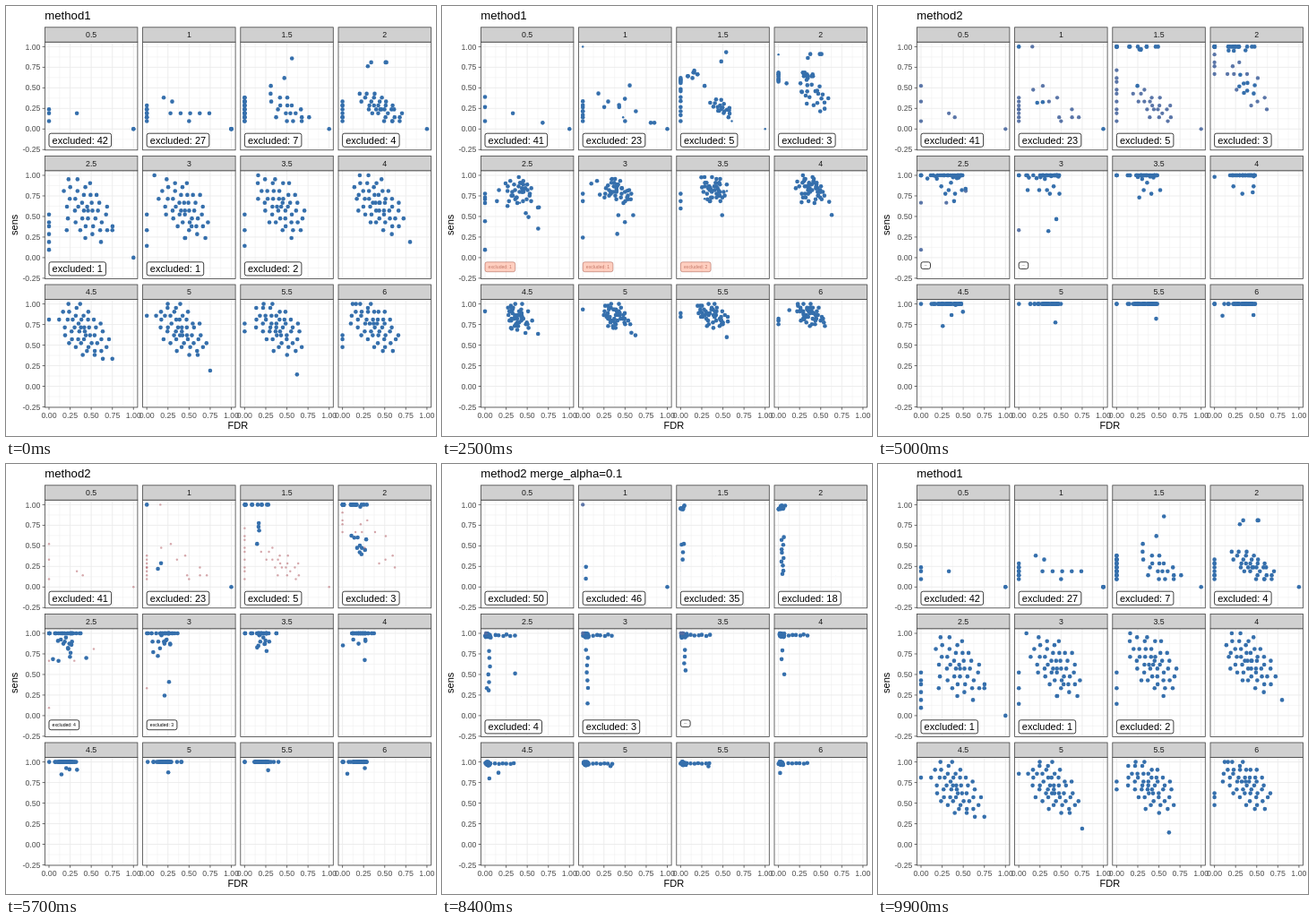
Animation of 480x480 px, one loop 10000 ms. Source, as an HTML page:

```html
<!DOCTYPE html>
<html lang="en">
<head>
<meta charset="utf-8">
<title>sens / FDR</title>
<style>
html, body { margin: 0; width: 100%; height: 100%; overflow: hidden; background: #fff; }
svg { display: block; width: 100vw; height: 100vh; font-family: "Liberation Sans", Arial, sans-serif; }
</style>
</head>
<body>
<svg id="chart" viewBox="0 0 480 480"></svg>
<script>
const svg = document.getElementById('chart');
const BLUE = '#356fac', GRID = '#ebebeb', EDGE = '#444';
const X0 = 48, Y0 = 137.3, UX = 94.3, UY = 91.9, DX = 109.2, DY = 143.6;
const LEFT = 43.4, TOP = 40.2, W = 103.5, H = 120.6;
const R = 2.3, PAD = 3.6, FONT = 11, CAP = 7.9, TAG_Y = 4.9;

function set(el, attrs) {
  for (const k in attrs) el.setAttribute(k, attrs[k]);
}
function add(tag, attrs, parent = svg) {
  const el = document.createElementNS('http://www.w3.org/2000/svg', tag);
  set(el, attrs);
  return parent.appendChild(el);
}
function label(str, x, y, size, fill = '#000', anchor = 'middle', more = {}) {
  const el = add('text', { x, y, 'font-size': size, fill, 'text-anchor': anchor, ...more });
  el.textContent = str;
  return el;
}
const line = (x1, y1, x2, y2, stroke, width) =>
  add('line', { x1, y1, x2, y2, stroke, 'stroke-width': width });
const mix = (a, b, t) => a + (b - a) * t;
const clamp = (v, lo, hi) => Math.max(lo, Math.min(hi, v));

let seed = 7;
function rnd() {
  seed = (seed * 1664525 + 1013904223) % 4294967296;
  return seed / 4294967296;
}

// A point is [FDR in percent, sens in 21sts]; null is an excluded run.
const many = (n, make) => Array.from({ length: n }, (_, i) => make(i));
const column = (n, lo, hi) => many(n, i => [0, Math.round(mix(lo, hi, n > 1 ? i / (n - 1) : 0))]);
const row = (n, lo, hi, k = 21) => many(n, () => [mix(lo, hi, Math.sqrt(rnd())), k]);
const spread = (n, lo, hi, k = 21) => many(n, i => [mix(lo, hi, i / (n - 1)), k]);
const corner = n => many(n, () => [5 * rnd() * rnd(), 21]);
const drop = (n, lo, hi) => many(n, i => [1 + 2.5 * rnd(), mix(lo, hi, (i + 0.5) / n)]);
function cloud(n, cx, rx, cy, ry, slope) {
  const phase = rnd() * 6.28;
  return many(n, i => {
    const r = Math.pow((i + 0.5) / n, 0.65), a = phase + i * 2.4;
    const dx = rx * r * Math.cos(a);
    const k = Math.round(cy + slope * dx + ry * r * Math.sin(a));
    return [cx + dx, clamp(k, 2, 21)];
  });
}

// Linked runs hold one point per method; the other runs follow in order.
const panels = [];
function panel(name, excluded, linked, ...rest) {
  const states = rest.map((points, i) => [...linked.map(run => run[i]), ...points]);
  panels.push({ name, excluded, states });
}
const NIL = [100, 0];

panel('0.5', [42, 41, 50], [
  [[33, 4], [33, 4], null],
  [NIL, [40, 3], null],
  [NIL, NIL, null]
], column(3, 2, 5), column(3, 2, 11), []);

panel('1', [27, 23, 46], [
  [[30, 7], [30, 7], [2, 5]],
  [[28, 4], [23, 7], [2, 2]],
  [NIL, NIL, NIL],
  [null, [0, 21], [0, 21]],
  [NIL, [16, 21], null],
  [NIL, [63, 3], null],
  [NIL, [71, 3], null],
  [[50, 2], [50, 2], null],
  [[20, 8], [17, 10], null]
], [...column(8, 2, 6), ...spread(4, 40, 74, 4)],
  [...column(8, 2, 8), ...cloud(5, 45, 28, 7, 4, -0.1)], []);

panel('1.5', [7, 5, 35], [
  [[56, 18], [52, 21], [1, 21]],
  [[47, 13], [49, 21], [1, 21]],
  [[31, 11], [26, 11], [2, 11]]
], [...column(12, 2, 8), ...column(9, 2, 8), ...cloud(18, 52, 26, 4.6, 4, -0.1), NIL],
  [...row(4, 0, 0), ...row(8, 9, 38), ...column(9, 2, 15), ...cloud(20, 44, 26, 6, 4, -0.12), NIL],
  [...corner(9), ...drop(3, 6, 12)]);

panel('2', [4, 3, 18], [
  [[30, 16], [39, 20], [1, 21]],
  [[34, 17], [41, 21], [2, 21]],
  [[51, 17], [47, 21], [1, 21]],
  [[52, 17], [50, 21], [5, 21]]
], [...column(8, 2, 7), ...cloud(33, 46, 28, 5.4, 3.6, -0.11), NIL],
  [...row(8, 0, 0), ...row(12, 8, 31), ...cloud(19, 39, 27, 11, 5, -0.16), ...column(4, 14, 19)],
  [...corner(18), ...drop(10, 2.5, 14)]);

// From 2.5 on, each panel follows one rule driven by its effect size.
function dense(size, excluded, zeros, linked = []) {
  const left = 50 - linked.length, low = Math.max(0, Math.round(12 - 2.4 * size));
  const n = zeros[0];
  panel(String(size), excluded, linked,
    [...column(...zeros), ...cloud(left - n - excluded[0], 50 - 2 * size, 31, 10 + 0.9 * size, 9 - 0.5 * size, -0.12)],
    [...row(n || 1, 0, 0), ...row(left - (n || 1) - low - 1, 8, 51), ...cloud(low + 1, 38, 18, 17, 3, 0)],
    [...corner(n), ...drop(low, mix(5, 16, (size - 2.5) / 2), 18), ...spread(6, 10, 34), ...corner(left - n - low - 6)]);
}
dense(2.5, [1, 0, 4], [4, 6, 11], [
  [[0, 2], [0, 2], null],
  [[0, 4], [0, 14], null],
  [NIL, [30, 14], null],
  [[43, 5], [53, 17], null],
  [[21, 7], [8, 21], [1, 7]],
  [[75, 7], [54, 18], [33, 11]]
]);
dense(3, [1, 0, 3], [2, 7, 11], [
  [[0, 3], [0, 7], null],
  [[45, 5], [37, 7], [3, 3]],
  [[53, 8], [47, 10], [3, 7]],
  [[9, 21], [11, 17], [2, 21]]
]);
dense(3.5, [2, 0, 0], [3, 3, 11], [[[16, 21], [32, 20], [1, 21]]]);
dense(4, [0, 0, 0], [0, 0, 0], [[[80, 4], [48, 17], [2, 11]]]);
dense(4.5, [0, 0, 0], [1, 17, 17], [[[75, 7], [52, 19], [12, 19]]]);
dense(5, [0, 0, 0], [1, 18, 18], [[[75, 4], [51, 21], [30, 21]]]);
dense(5.5, [0, 0, 0], [2, 14, 16], [[[62, 3], [48, 21], [31, 21]]]);
dense(6, [0, 0, 0], [3, 10, 13], [[[16, 21], [10, 18], [1, 18]]]);

// Fixed parts: grid, strips, axes.
add('rect', { width: 480, height: 480, fill: '#fff' });
const title = label('', 43.3, 15, 13.2, '#000', 'start');
label('FDR', 258.9, 472.4, FONT);
label('sens', 0, 0, FONT, '#000', 'middle', { transform: 'translate(13.4 244.3) rotate(-90)' });

panels.forEach((p, i) => {
  const col = i % 4, rowNo = Math.floor(i / 4);
  const left = LEFT + col * DX, top = TOP + rowNo * DY, bottom = top + H;
  p.ox = X0 + col * DX;
  p.oy = Y0 + rowNo * DY;
  for (let v = -0.25; v <= 1; v += 0.125) {
    const x = p.ox + v * UX, y = p.oy - v * UY;
    const width = v % 0.25 ? 0.45 : 0.9;
    line(left, y, left + W, y, GRID, width);
    if (v >= 0) line(x, top, x, bottom, GRID, width);
  }
  const layer = add('g', {});
  p.dots = many(Math.max(...p.states.map(s => s.length)), () => add('circle', { fill: BLUE }, layer));
  if (p.excluded.some(Boolean)) {
    p.box = add('rect', { x: p.ox, y: p.oy + TAG_Y, rx: 2.2, 'stroke-width': 0.75 });
    p.tag = add('text', { x: p.ox + PAD });
  }
  const frame = { x: left, width: W, stroke: EDGE, 'stroke-width': 0.8 };
  add('rect', { ...frame, y: top, height: H, fill: 'none' });
  add('rect', { ...frame, y: top - 16.4, height: 16.4, fill: '#d0d0d0' });
  label(p.name, left + W / 2, top - 5.1, 8.8, '#1a1a1a');
  for (let v = -0.25; v <= 1; v += 0.25) {
    const x = p.ox + v * UX, y = p.oy - v * UY;
    if (col === 0) {
      line(left - 2.75, y, left, y, EDGE, 0.8);
      label(v.toFixed(2), left - 4.9, y + 3.1, 8.8, '#4d4d4d', 'end');
    }
    if (rowNo === 2 && v >= 0) {
      line(x, bottom, x, bottom + 2.75, EDGE, 0.8);
      label(v.toFixed(2), x, bottom + 11.6, 8.8, '#4d4d4d');
    }
  }
});

// Entering parts grow; leaving parts shrink, redden and fade.
const redden = (from, t) => `color-mix(in lab, ${from}, red ${(t * 100).toFixed(1)}%)`;
const scale = (a, b, t) => a && b ? 1 : b ? t : a ? 1 - t : 0;

function drawDot(p, el, a, b, t) {
  const size = scale(a, b, t), exit = !b;
  el.style.display = size ? '' : 'none';
  if (!size) return;
  const from = a || b, to = b || a;
  el.style.fill = exit ? redden(BLUE, t) : BLUE;
  set(el, {
    cx: p.ox + mix(from[0], to[0], t) / 100 * UX,
    cy: p.oy - mix(from[1], to[1], t) / 21 * UY,
    r: R * size,
    opacity: exit ? 1 - t : 1
  });
}

function drawTag(p, a, b, t) {
  const size = scale(a, b, t), exit = !b;
  p.box.style.display = p.tag.style.display = size ? '' : 'none';
  if (!size) return;
  const n = a && b ? (t < 0.5 ? a : b) : a || b;
  const alpha = exit ? 1 - t : 1;
  p.tag.textContent = 'excluded: ' + n;
  set(p.tag, { y: p.oy + TAG_Y + PAD + CAP * size, 'font-size': FONT * size, opacity: alpha });
  set(p.box, {
    width: (n > 9 ? 62.4 : 56.3) * size + 2 * PAD,
    height: CAP * size + 2 * PAD,
    'fill-opacity': alpha,
    'stroke-opacity': alpha
  });
  p.tag.style.fill = p.box.style.stroke = exit ? redden('black', t) : '#000';
  p.box.style.fill = exit ? redden('white', t) : '#fff';
}

const titles = ['method1', 'method2', 'method2 merge_alpha=0.1'];
const moves = [[16, 17], [49, 17], [83, 16]];

function draw(step) {
  let from = 2, done = 16;
  moves.forEach(([start, length], i) => {
    if (step > start) {
      from = i;
      done = Math.min(length, step - start);
    }
  });
  const to = (from + 1) % 3, length = moves[from][1], t = done / length;
  title.textContent = titles[done > Math.ceil(length / 2) ? to : from];
  for (const p of panels) {
    const a = p.states[from], b = p.states[to];
    p.dots.forEach((el, i) => drawDot(p, el, a[i], b[i], t));
    if (p.tag) drawTag(p, p.excluded[from], p.excluded[to], t);
  }
}

let last = -1;
const begin = performance.now();
function tick() {
  const step = Math.floor((performance.now() - begin) / 100) % 100;
  if (step !== last) draw(last = step);
  requestAnimationFrame(tick);
}
tick();
</script>
</body>
</html>
```
